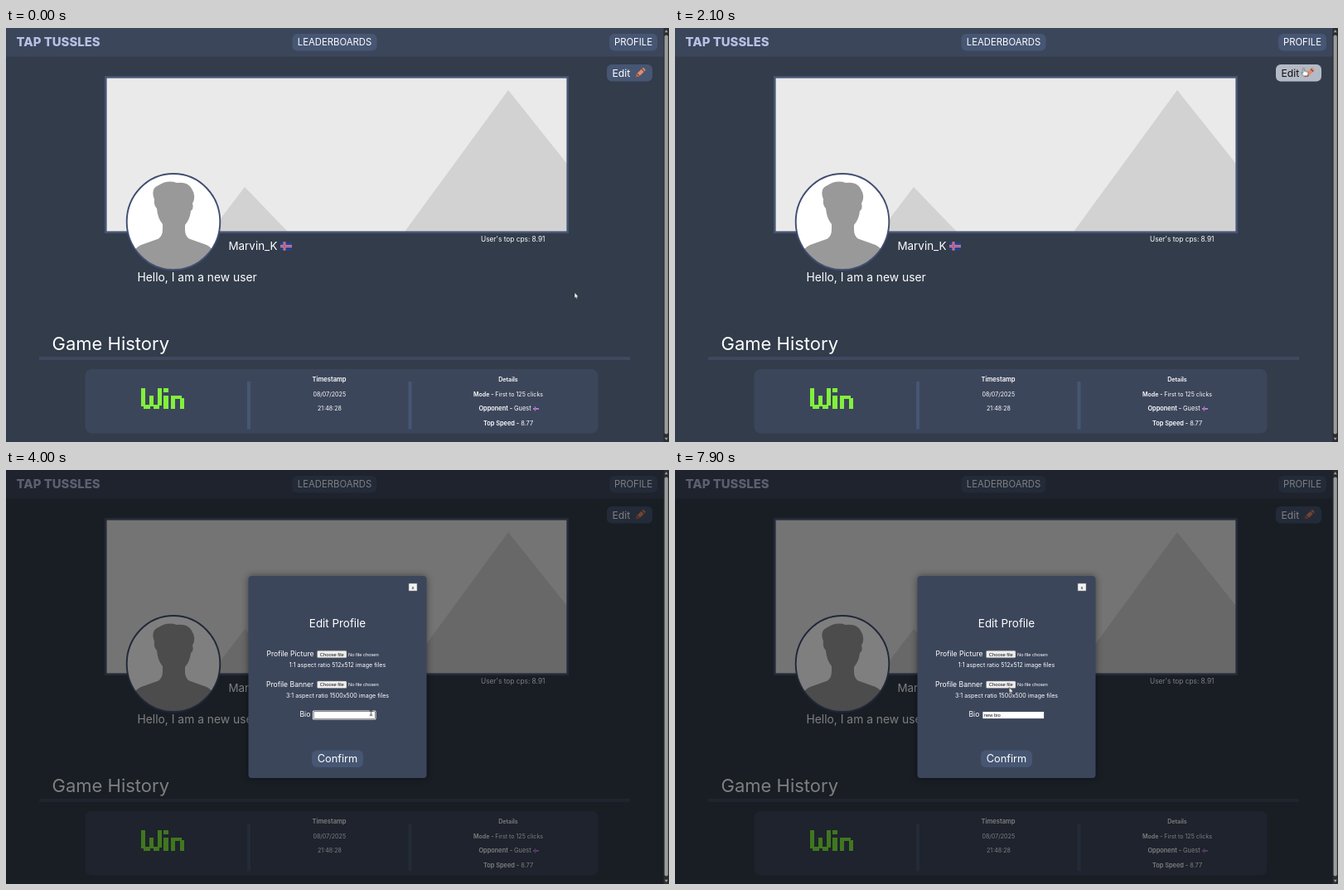
Animation, 800 px wide and 500 px high, one loop 8000 ms. Source, as an HTML page:

```html
<!DOCTYPE html>
<html lang="en">
<head>
<meta charset="utf-8">
<title>Profile editor</title>
<style>
  html, body { margin: 0; width: 100%; height: 100%; overflow: hidden; background: #323c4b; }
  svg { display: block; width: 800px; height: 500px; }
  text { font-family: Inter, "Open Sans", sans-serif; fill: #fff; white-space: pre; }
  .mid { text-anchor: middle; }
  .bold { font-weight: 600; }
  .nav { font-size: 11.3px; }
  .row { font-size: 7.1px; }
  .label { font-size: 8.6px; }
  .form { font: 5.8px "Liberation Sans", Arial, sans-serif; fill: #111; }
  .btn { fill: #465673; }
  .panel { fill: #3c465b; }
  .line { fill: #465673; }

  .hover, .modal, .focus, .typing, .arrow, .hand, .beam { animation: 8s step-end infinite; }
  .hover, .hand { animation-name: hover; }
  .modal { animation-name: modal; }
  .focus { animation-name: focus; }
  .typing { animation-name: typing; }
  .arrow { animation-name: arrow; }
  .beam { animation-name: beam; }
  .cursor { animation: move 8s linear infinite; }
  .box { filter: drop-shadow(0 0 4px rgba(0, 0, 0, .45)); }

  @keyframes hover { 0%, 27.45% { visibility: hidden } 23.7% { visibility: visible } }
  @keyframes modal { 0% { visibility: hidden } 27.45%, 100% { visibility: visible } }
  @keyframes focus { 0%, 86.2% { opacity: 0 } 47.4% { opacity: 1 } }
  @keyframes arrow {
    0%, 27.45%, 81.2% { opacity: 1 }
    23.7%, 43.7% { opacity: 0 }
  }
  @keyframes beam { 0%, 81.2% { opacity: 0 } 43.7% { opacity: 1 } }
  /* The white cover slides right by one letter at a time. */
  @keyframes typing {
    0% { transform: translateX(0) }
    54.9% { transform: translateX(3.4px) }
    56.2% { transform: translateX(6.6px) }
    58.7% { transform: translateX(10.8px) }
    61.2% { transform: translateX(12.4px) }
    63.7% { transform: translateX(15.6px) }
    64.9% { transform: translateX(17px) }
    67.4%, 100% { transform: translateX(21px) }
  }
  @keyframes move {
    0% { transform: translate(686px, 319.5px); animation-timing-function: ease-out }
    12.5%, 15% { transform: translate(673.7px, 310.3px); animation-timing-function: ease-in-out }
    25% { transform: translate(758px, 49px) }
    27.5%, 32.5% { transform: translate(757.3px, 48px); animation-timing-function: ease-in-out }
    45%, 78.7% { transform: translate(440.5px, 293.3px); animation-timing-function: ease-in-out }
    97.5%, 100% { transform: translate(403.3px, 262.5px) }
  }
</style>
</head>
<body>
<svg viewBox="0 0 800 500">
  <defs>
    <clipPath id="face"><ellipse cx="202" cy="234" rx="56" ry="57.500"/></clipPath>
    <g id="flag">
      <path fill="#26418f" d="M0 1Q3.500 -.5 7 .8T14 .6V10Q10.500 11 7 10.200T0 10.400Z"/>
      <path stroke="#d9cfe4" stroke-width="2.600" d="M5 .3V10.500M0 5.500H14"/>
      <path stroke="#cf4060" stroke-width="1.500" d="M5 .3V10.500M0 5.500H14"/>
    </g>
    <g id="crayon" transform="translate(765 54.400) rotate(-43)">
      <path fill="#b9573f" d="M-7.500 0L-4 -1.900V1.900Z"/>
      <rect x="-4.500" y="-2.200" width="12" height="4.400" rx="1" fill="#e58a68"/>
      <path stroke="#6b4040" stroke-width="1.200" d="M-3 -2.200V2.200M5 -2.200V2.200"/>
    </g>
    <g id="picker">
      <rect x="375.500" y="-4.300" width="35.500" height="8.600" rx="1.300" fill="#efefef" stroke="#777" stroke-width=".5"/>
      <text class="form mid" x="393.300" y="2.100">Choose file</text>
      <text class="form" x="413" y="2.100" style="fill:#fff">No file chosen</text>
    </g>
  </defs>

  <rect width="800" height="500" fill="#323c4b"/>
  <rect class="panel" width="794" height="34.500"/>
  <text x="12.500" y="22.400" font-size="14.900" font-weight="800" style="fill:#b8c0e4">TAP TUSSLES</text>

  <rect class="btn" x="345.500" y="7" width="102" height="20.500" rx="6"/>
  <text class="nav mid" x="396.500" y="21.300">LEADERBOARDS</text>
  <rect class="btn" x="728" y="7" width="58" height="20.500" rx="6"/>
  <text class="nav mid" x="757" y="21.300">PROFILE</text>

  <rect class="btn" x="725" y="44" width="55" height="20.500" rx="6"/>
  <text x="731.500" y="58.600" font-size="12.200">Edit</text>
  <g class="hover">
    <rect x="725" y="44" width="55" height="20.500" rx="6" fill="#b4bac6"/>
    <text x="731.500" y="58.600" font-size="12.200" style="fill:#111">Edit</text>
  </g>
  <use href="#crayon"/>

  <rect x="120.300" y="59.300" width="557.400" height="187.400" fill="#eaeaea"/>
  <path fill="#d2d2d2" d="M247 246L288 192L340 246ZM481 246L606 75L677 164V246Z"/>
  <rect x="120.300" y="59.300" width="557.400" height="187.400" fill="none" stroke="#475472" stroke-width="2.600"/>

  <ellipse cx="202" cy="234" rx="56.300" ry="58" fill="#fff"/>
  <path clip-path="url(#face)" fill="#999" d="M145 295V282Q154 266 163 262L184 254.500Q189 251 189 243V237Q183 230 182 218Q178 214 179 207Q174 194 184 190Q195 183 206 187Q219 185 224 194Q230 203 225 212Q227 218 223 221Q222 231 216 238V244Q216 251 221 254.500L242 262Q251 266 257 282V295Z"/>
  <ellipse cx="202" cy="234" rx="56.300" ry="58" fill="none" stroke="#414e70" stroke-width="1.900"/>

  <text x="268.500" y="268.300" font-size="13.400">Marvin_K</text>
  <use href="#flag" x="331" y="258"/>
  <text x="158.500" y="305.800" font-size="13.850">Hello, I am a new user</text>
  <text class="mid" x="611.700" y="258.200" font-size="8.300">User's top cps: 8.91</text>

  <text x="55.500" y="389" font-size="22">Game History</text>
  <rect x="40" y="397" width="713" height="4" fill="#3e495f"/>
  <rect class="panel" x="95.500" y="412" width="619" height="77.500" rx="8"/>
  <rect class="line" x="291" y="427" width="4" height="57.500"/>
  <rect class="line" x="485.500" y="427" width="4" height="57.500"/>
  <path fill="#82f03c" d="M163 435h5v20h5v-11h5v11h5v-20h5v21h-3v4h-7v-3h-4v3h-8v-3h-3ZM190 435h6v5h-6ZM190 444h6v16h-6ZM199 444h13v3h3v13h-5v-12h-6v12h-5Z"/>

  <text class="row bold mid" x="390" y="426.600" style="font-size:7.600px">Timestamp</text>
  <text class="row mid" x="390.300" y="444.500">08/07/2025</text>
  <text class="row mid" x="390.500" y="462.200">21:48:28</text>
  <text class="row bold mid" x="606" y="426.600">Details</text>
  <text class="row mid" x="606" y="444.500"><tspan class="bold">Mode - </tspan>First to 125 clicks</text>
  <text class="row mid" x="602" y="462.200" style="font-size:7.400px"><tspan class="bold">Opponent - </tspan>Guest</text>
  <use href="#flag" transform="translate(636 457) scale(.5)"/>
  <text class="row mid" x="606" y="479.600" style="font-size:7.400px"><tspan class="bold">Top Speed - </tspan>8.77</text>

  <g class="modal">
    <rect width="794" height="500" fill="#000" fill-opacity=".5"/>
    <rect class="panel box" x="292.500" y="128" width="215" height="244" rx="4"/>
    <rect x="486" y="137" width="10" height="9" fill="#f2f2f2" stroke="#777" stroke-width=".5"/>
    <text class="form mid" x="491" y="143.600">x</text>
    <text class="mid" x="400" y="190.300" font-size="13.400">Edit Profile</text>

    <text class="label" x="314.500" y="224.700">Profile Picture</text>
    <use href="#picker" y="222.500"/>
    <text class="row mid" x="400" y="237.900">1:1 aspect ratio 512x512 image files</text>
    <text class="label" x="314" y="261.500">Profile Banner</text>
    <use href="#picker" y="259.200"/>
    <text class="row mid" x="400" y="274.600">3:1 aspect ratio 1500x500 image files</text>

    <text class="label" x="354.500" y="298.200">Bio</text>
    <rect class="focus" x="369.900" y="290.500" width="76.600" height="11" rx="1.500" fill="#fff"/>
    <rect class="focus" x="370.800" y="291.400" width="74.800" height="9.200" rx=".8" fill="#111"/>
    <rect x="371.400" y="292" width="73.700" height="8.100" fill="#fff"/>
    <text class="form" x="372.800" y="298">new bio</text>
    <rect class="typing" x="372.600" y="292.800" width="21.500" height="6.800" fill="#fff"/>

    <rect class="btn" x="369" y="338.500" width="62" height="20.500" rx="6"/>
    <text class="mid" x="400" y="353.300" font-size="12.800">Confirm</text>
  </g>

  <rect x="793.500" width="6.500" height="500" fill="#2b2c2f"/>
  <rect x="794.600" y="8.500" width="4.200" height="482" rx="2.100" fill="#9d9d9d"/>
  <path fill="#9d9d9d" d="M796.700 2l2 3.200h-4ZM796.700 498l2 -3.200h-4Z"/>

  <g class="cursor" stroke="#111" stroke-width=".5">
    <path class="arrow" fill="#fff" d="M0 0V7L1.600 5.600L2.700 8L3.900 7.500L2.800 5.200H5Z"/>
    <path class="hand" fill="#fff" d="M0 .5Q.8 -.5 1.600 .5V3.500L5.500 4.400Q6.500 5 6.300 7L5.500 9.500H1L-2 6Q-1.800 4.900 0 6Z"/>
    <path class="beam" fill="none" stroke-width=".8" d="M-1.800 -2.600H1.800M0 -2.600V3M-1.800 3H1.800"/>
  </g>
</svg>
</body>
</html>
```
